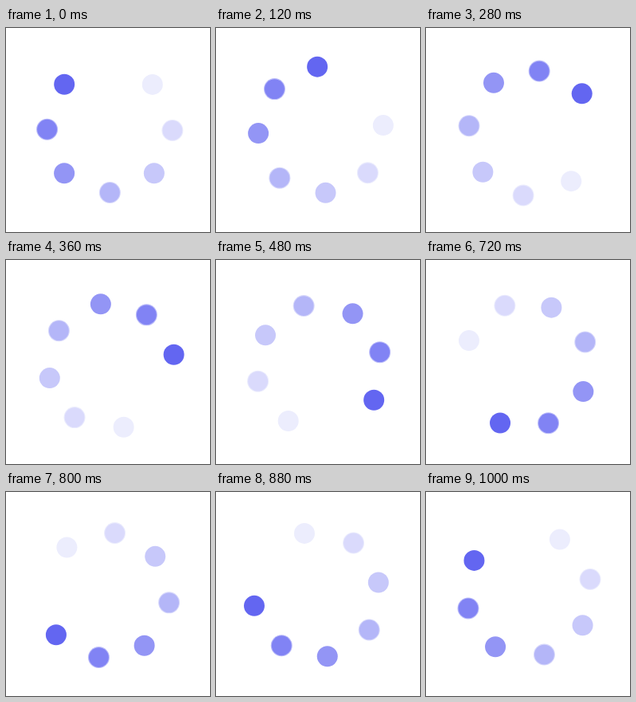
Write an HTML page with a canvas that moves like this. It is 256x256 px and loops after 1.04 s.

```html
<!DOCTYPE html>
<html lang="en">
<head>
<meta charset="utf-8">
<title>Loading</title>
<style>
  html, body { margin: 0; width: 100%; height: 100%; overflow: hidden; background: #fff; }
  canvas { display: block; width: 256px; height: 256px; }
</style>
</head>
<body>
<canvas id="stage"></canvas>
<script>
const LOOP = 1040, STEP = 40;
const PIVOT = { x: 129.3, y: 130.8 };
const RADIUS = 13;

// The ring turns about a point slightly below its middle,
// so every dot keeps its own distance from the pivot.
const dots = [
  { dist: 82.2, angle: 226.95, alpha: 1 },
  { dist: 77.8, angle: 182.6, alpha: 0.81, soft: true },
  { dist: 76.2, angle: 137.5, alpha: 0.69 },
  { dist: 75.7, angle: 89.2, alpha: 0.48, soft: true },
  { dist: 76.5, angle: 42.3, alpha: 0.36 },
  { dist: 79.6, angle: -1.7, alpha: 0.24, soft: true },
  { dist: 81, angle: -47.7, alpha: 0.12 }
];

const canvas = document.getElementById('stage');
const ctx = canvas.getContext('2d');
const ratio = window.devicePixelRatio || 1;
canvas.width = canvas.height = 256 * ratio;
ctx.scale(ratio, ratio);

// Indigo blended with white
function tint(alpha) {
  const mix = c => Math.round(255 + (c - 255) * alpha);
  return `rgb(${mix(99)}, ${mix(102)}, ${mix(241)})`;
}

function disc(x, y, r, color) {
  ctx.fillStyle = color;
  ctx.beginPath();
  ctx.arc(x, y, r, 0, Math.PI * 2);
  ctx.fill();
}

function draw(time) {
  const turn = Math.floor((time % LOOP) / STEP) * STEP / LOOP * 360;
  ctx.fillStyle = '#fff';
  ctx.fillRect(0, 0, 256, 256);
  for (const { dist, angle, alpha, soft } of dots) {
    const a = (angle + turn) * Math.PI / 180;
    const x = PIVOT.x + dist * Math.cos(a);
    const y = PIVOT.y + dist * Math.sin(a);
    if (soft) disc(x, y, RADIUS + 0.5, tint(alpha * 0.55));
    disc(x, y, soft ? RADIUS - 0.6 : RADIUS, tint(alpha));
  }
}

const start = performance.now();
function tick() {
  draw(performance.now() - start);
  requestAnimationFrame(tick);
}
tick();
</script>
</body>
</html>
```
